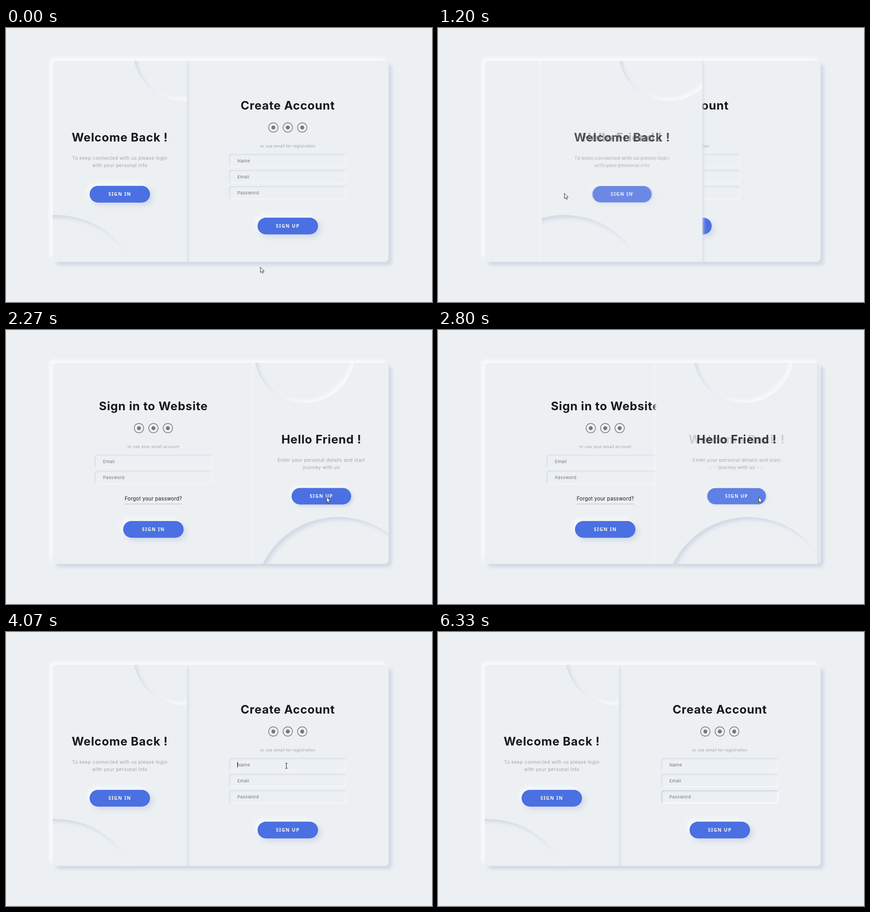
Write an HTML page that moves like this. It is 932 px wide and 601 px high and loops after 6.39 s.

```html
<!DOCTYPE html>
<html lang="en">
<head>
<meta charset="utf-8">
<title>Sliding sign-in card</title>
<style>
:root { --bg: #ecf0f3; --dark: #d1d9e6; --light: #f9f9f9; }
* { box-sizing: border-box; margin: 0; padding: 0; }
html, body { width: 100%; height: 100%; overflow: hidden; background: var(--bg); }
body { position: relative; font: 12px Inter, sans-serif; color: #a0a5a8; }
.card {
  position: absolute; left: 102px; top: 72px; width: 1000px; height: 600px;
  transform: scale(.735); transform-origin: 0 0; overflow: hidden; border-radius: 12px;
  background: var(--bg); box-shadow: 10px 10px 10px var(--dark), -10px -10px 10px var(--light);
}
.form, .text { display: flex; flex-direction: column; align-items: center; justify-content: center; }
.form { position: absolute; top: 0; width: 600px; height: 600px; background: var(--bg); }
h2 { font-size: 35px; line-height: 102px; letter-spacing: 1px; color: #181818; white-space: nowrap; }
.icons { display: flex; gap: 13px; height: 33px; }
.icons i {
  width: 30px; height: 30px; border: 2px solid #75787a; border-radius: 50%;
  background: radial-gradient(circle, #75787a 5.5px, transparent 6.2px);
}
.note { margin: 30px 0 12px; line-height: 15px; letter-spacing: .31px; }
.input {
  width: 350px; height: 40px; margin: 4px 0; padding-left: 25px; border-radius: 8px;
  font-size: 13px; line-height: 40px; letter-spacing: .5px; color: #757575;
  box-shadow: inset 2px 2px 4px var(--dark), inset -2px -2px 4px var(--light);
}
.link {
  margin-top: 25px; height: 31px; border-bottom: 1px solid #a0a5a8;
  font-size: 15px; line-height: 30px; letter-spacing: .38px; color: #181818;
}
.button {
  width: 180px; height: 50px; margin-top: 50px; border-radius: 25px; text-align: center;
  font: 700 14px/50px "Noto Sans", sans-serif; letter-spacing: 1.85px;
  color: #f9f9f9; background: #4b70e2;
  box-shadow: 8px 8px 16px var(--dark), -8px -8px 16px var(--light);
}
.switch {
  position: absolute; top: 0; height: 600px; overflow: hidden; z-index: 3; background: var(--bg);
  box-shadow: 4px 4px 10px var(--dark), -4px -4px 10px var(--light);
}
.circle {
  position: absolute; top: 460px; width: 500px; height: 500px; border-radius: 50%;
  background: var(--bg); box-shadow: inset 8px 8px 12px var(--dark), inset -8px -8px 12px var(--light);
}
.circle.small { top: -180px; width: 300px; height: 300px; }
.text { position: absolute; top: 0; left: 50%; width: 400px; height: 600px; margin-left: -200px; }
.text p { font-size: 14px; line-height: 1.6; letter-spacing: .59px; text-align: center; white-space: nowrap; }
#caret { position: absolute; left: 506px; width: 1px; height: 12px; background: #000; }
#pointer { position: absolute; left: 0; top: 0; width: 932px; height: 601px; }
</style>
</head>
<body>
<div class="card">
  <div class="form" id="signUp">
    <h2>Create Account</h2>
    <div class="icons"><i></i><i></i><i></i></div>
    <div class="note">or use email for registration</div>
    <div class="input">Name</div>
    <div class="input">Email</div>
    <div class="input" id="password">Password</div>
    <div class="button">SIGN UP</div>
  </div>
  <div class="form" id="signIn">
    <h2>Sign in to Website</h2>
    <div class="icons"><i></i><i></i><i></i></div>
    <div class="note">or use your email account</div>
    <div class="input">Email</div>
    <div class="input">Password</div>
    <div class="link">Forgot your password?</div>
    <div class="button">SIGN IN</div>
  </div>
  <div class="switch" id="panel">
    <div class="circle" id="big"></div>
    <div class="circle small" id="small"></div>
    <div class="text" id="welcome">
      <h2>Welcome Back !</h2>
      <p>To keep connected with us please login<br>with your personal info</p>
      <div class="button" id="toSignIn">SIGN IN</div>
    </div>
    <div class="text" id="hello">
      <h2>Hello Friend !</h2>
      <p>Enter your personal details and start<br>journey with us</p>
      <div class="button" id="toSignUp">SIGN UP</div>
    </div>
  </div>
</div>
<div id="caret"></div>
<svg id="pointer">
  <path id="arrow" d="M.5 .5V12.4L3.2 9.9 5 14 7 13.1 5.2 9.1H9z" fill="#fff" stroke="#1c1c1c" stroke-width=".9"/>
  <path id="beam" d="M-2 -5H3M.5 -5V6M-2 6H3" fill="none" stroke="#222"/>
</svg>
<script>
const LOOP = 6390;
// Each slide: start of the move, start of the swelling, length
const there = { move: 966, swell: 966, length: 1205 };
const back = { move: 2637, swell: 2555, length: 1250 };

const $ = id => document.getElementById(id);
const clamp = x => Math.min(1, Math.max(0, x));
const mix = (a, b, k) => a + (b - a) * k;

// cubic-bezier(.25, .1, .25, 1)
function ease(x) {
  x = clamp(x);
  let lo = 0, hi = 1, s;
  for (let i = 0; i < 24; i++) {
    s = (lo + hi) / 2;
    if (.75 * s * (1 - s) + s ** 3 < x) lo = s; else hi = s;
  }
  return .3 * s * (1 - s) ** 2 + 3 * s * s * (1 - s) + s ** 3;
}
const ramp = (t, start, length = 250) => ease((t - start) / length);
const moved = (t, slide) => ramp(t, slide.move, slide.length);
const ended = (t, slide) => t > slide.move + slide.length;

// The panel swells from 400 to 500 and shrinks again while it slides
function swell(t, slide) {
  const x = (t - slide.swell) / slide.length;
  return x < .5 ? ease((x - .1) / .2) : 1 - ease((x - .5) / .5);
}

// time, x, y of the pointer's hot spot
const path = [
  [70, 556, 524], [640, 276, 362], [1200, 276, 362], [1800, 684, 405], [2180, 701, 366],
  [2800, 701, 366], [3400, 628, 248], [3930, 613, 293], [4070, 613, 293], [4400, 574, 336],
  [4600, 574, 336], [4800, 570, 369], [5130, 570, 369], [5730, 106, 596]
];
function pointerAt(t) {
  const i = path.findIndex(p => p[0] > t);
  if (i === 0) return path[0].slice(1);
  if (i < 0) return path[path.length - 1].slice(1);
  const [t0, x0, y0] = path[i - 1], [t1, x1, y1] = path[i];
  const u = (t - t0) / (t1 - t0), k = u * u * (3 - 2 * u);
  return [mix(x0, x1, k), mix(y0, y1, k)];
}

const show = (el, on) => el.style.visibility = on ? "visible" : "hidden";
const place = (el, x, y) => el.setAttribute("transform", `translate(${Math.round(x)} ${Math.round(y)})`);

function press(el, hover, down) {
  const d = 8 - 2 * hover - 4 * down, blur = 16 - 6 * hover - 4 * down;
  el.style.transform = `scale(${1 - .015 * (hover + down)})`;
  el.style.boxShadow = `${d}px ${d}px ${blur}px #d1d9e6, ${-d}px ${-d}px ${blur}px #f9f9f9`;
}

function drawCard(t) {
  const p = moved(t, there) - moved(t, back);
  const w = 400 + 100 * swell(t, ended(t, there) ? back : there);
  $("panel").style.left = 600 * p + "px";
  $("panel").style.width = w + "px";
  $("big").style.left = mix(-.6 * w, w - 400, p) + "px";
  $("small").style.left = mix(.6 * w, w - 400, p) + "px";
  $("welcome").style.opacity = 1 - p;
  $("hello").style.opacity = p;
  $("signUp").style.left = $("signIn").style.left = 400 * (1 - p) + "px";
  $("signUp").style.zIndex = 1;
  $("signIn").style.zIndex = p < .5 ? 0 : 2;

  const first = !ended(t, there), second = !ended(t, back);
  press($("toSignIn"), first && ramp(t, 480), first && ramp(t, 900));
  press($("toSignUp"), second && ramp(t, 2020), second && ramp(t, 2540));

  const d = 2 + 2 * ramp(t, 5130);
  $("password").style.boxShadow = `inset ${d}px ${d}px 4px #d1d9e6, inset ${-d}px ${-d}px 4px #f9f9f9`;
}

function drawPointer(t) {
  const [x, y] = pointerAt(t), row = (y - 276) % 35.3;
  const text = t > 3800 && x > 488 && x < 745 && y > 276 && y < 376 && row < 29.4;
  show($("arrow"), !text && t < 5800);
  show($("beam"), text);
  place($("arrow"), x, y);
  place($("beam"), x, y);

  const field = t < 4600 ? 0 : t < 5130 ? 1 : 2;
  show($("caret"), t >= 4070 && t < 5660 || t >= 6190 && t < 6330);
  $("caret").style.top = Math.round(285 + 35.3 * field) + "px";
}

function frame(now) {
  const t = now % LOOP;
  drawCard(t);
  drawPointer(t);
  requestAnimationFrame(frame);
}
requestAnimationFrame(frame);
</script>
</body>
</html>
```
